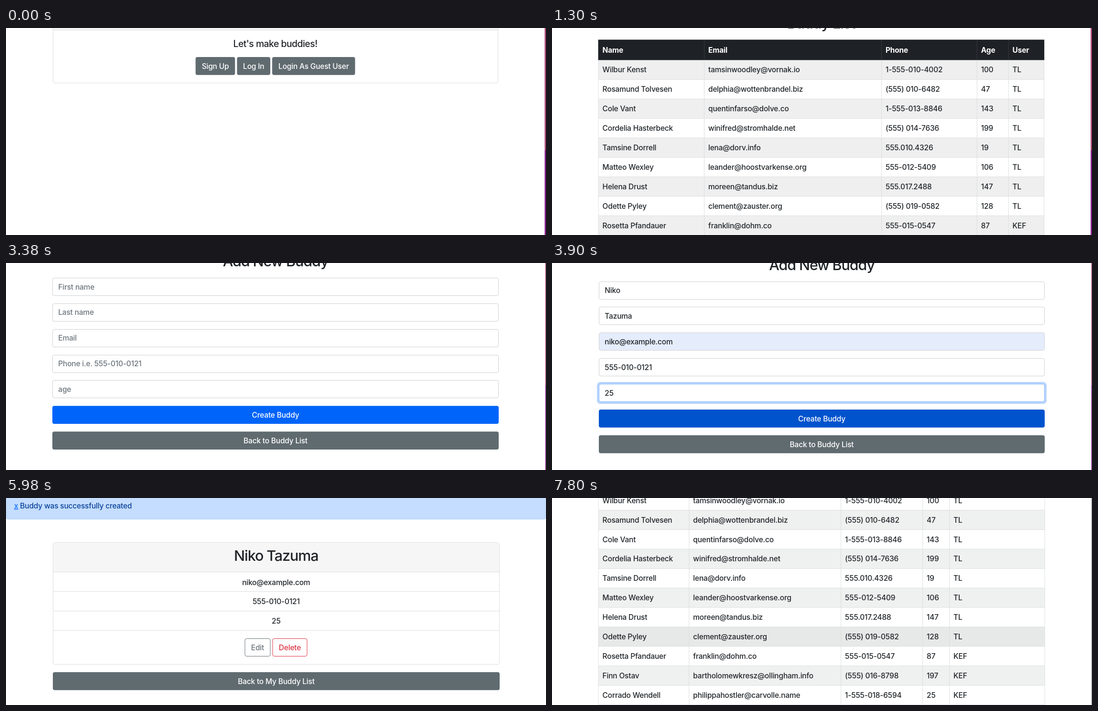
An HTML page for the animation above (8 s loop, 1130 by 435 pixels).

```html
<!DOCTYPE html>
<html lang="en">
<head>
<meta charset="utf-8">
<title>Buddy list</title>
<style>
  html, body { margin: 0; width: 100%; height: 100%; overflow: hidden; background: #fff; }
  svg { display: block; width: 1130px; height: 435px; }
  text {
    font: 450 15.5px Inter, "Open Sans", sans-serif;
    font-optical-sizing: none;
    letter-spacing: -.013em;
    fill: #212529;
  }
  .mid { text-anchor: middle; }
  .white { fill: #fff; }
  .hint { fill: #6c757d; }
  .red { fill: #dc3545; }
  .th { font-weight: 700; fill: #fff; }
  .h1, .h2, .h5 { font-weight: 550; letter-spacing: -.036em; }
  .h1 { font-size: 30.5px; }
  .h2 { font-size: 27px; }
  .h5 { font-size: 19.4px; letter-spacing: -.027em; }
  .notice { fill: #084298; }
  .link { fill: #0d6efd; text-decoration: underline; }

  .scene { visibility: hidden; animation: show 8s step-end infinite; }
  .scene:last-child { animation-name: show-last; }
  @keyframes show { 0% { visibility: visible; } 16.25%, 100% { visibility: hidden; } }
  @keyframes show-last { 0% { visibility: visible; } 2.5%, 100% { visibility: hidden; } }
</style>
</head>
<body>
<svg id="stage" viewBox="0 0 1130 435"></svg>
<script>
const GRAY = '#606b70', BLUE = '#0064fa', LINE = '#dcdee0', PITCH = 53.9;
const person = { first: 'Niko', last: 'Tazuma', email: 'niko@example.com', phone: '555-010-0121', age: '25' };
const fullName = `${person.first} ${person.last}`;

const buddies = [
  ['Wilbur Kenst', 'tamsinwoodley@vornak.io', '1-555-010-4002', 100, 'TL'],
  ['Rosamund Tolvesen', 'delphia@wottenbrandel.biz', '(555) 010-6482', 47, 'TL'],
  ['Cole Vant', 'quentinfarso@dolve.co', '1-555-013-8846', 143, 'TL'],
  ['Cordelia Hasterbeck', 'winifred@stromhalde.net', '(555) 014-7636', 199, 'TL'],
  ['Tamsine Dorrell', 'lena@dorv.info', '555.010.4326', 19, 'TL'],
  ['Matteo Wexley', 'leander@hoostvarkense.org', '555-012-5409', 106, 'TL'],
  ['Helena Drust', 'moreen@tandus.biz', '555.017.2488', 147, 'TL'],
  ['Odette Pyley', 'clement@zauster.org', '(555) 019-0582', 128, 'TL'],
  ['Rosetta Pfandauer', 'franklin@dohm.co', '555-015-0547', 87, 'KEF'],
  ['Finn Ostav', 'bartholomewkresz@ollingham.info', '(555) 016-8798', 197, 'KEF'],
  ['Corrado Wendell', 'philippahostler@carvolle.name', '1-555-018-6594', 25, 'KEF']
];

const rect = (x, y, w, h, fill, more = '') =>
  `<rect x="${x}" y="${y}" width="${w}" height="${h}" fill="${fill}" ${more}/>`;
const frame = (x, y, w, h, fill = '#fff', stroke = LINE) =>
  rect(x + .5, y + .5, w - 1, h - 1, fill, `stroke="${stroke}" rx="3.5"`);
const rule = (x, y, w, color = LINE) => rect(x, y, w, 1, color);
const text = (x, y, label, cls = '') => `<text x="${x}" y="${y}" class="${cls}">${label}</text>`;
const button = (x, y, w, label, fill = GRAY) =>
  rect(x, y, w, 37.8, fill, 'rx="4"') + text(x + w / 2, y + 24.7, label, 'mid white');
const outlined = (x, y, w, label, color, cls) =>
  frame(x, y, w, 38, '#fff', color) + text(x + w / 2, y + 24.7, label, 'mid ' + cls);

// cols holds the column edges; the last one is the right side of the table
function table(top, cols, rows, shade) {
  const step = 40.9, left = cols[0], width = cols[5] - left;
  let out = '';
  rows.forEach((row, i) => {
    const y = top + i * step;
    out += rect(left, y, width, step, shade(i)) + rule(left, y - .5, width);
    row.forEach((cell, c) => out += text(cols[c] + 8.6, y + 26, cell));
  });
  const bottom = top + rows.length * step;
  out += rule(left, bottom - .5, width);
  cols.forEach(x => out += rect(x - .3, top, 1, bottom - top, LINE));
  return out;
}

function welcome() {
  return frame(98, -60, 932, 176) + rect(99, 0, 930, 4, '#f7f7f7') + rule(98, 4, 932) +
    text(563.5, 40, "Let's make buddies!", 'mid h5') +
    button(396.7, 61, 82.6, 'Sign Up') + button(483.4, 61, 69.6, 'Log In') +
    button(557, 61, 173.5, 'Login As Guest User');
}

function buddyList() {
  const cols = [97, 318.4, 689.4, 889.2, 955, 1029.5];
  const titles = ['Name', 'Email', 'Phone', 'Age', 'User'];
  return text(563, 1, 'Buddy List', 'mid h1') +
    table(67.4, cols, buddies.slice(0, 9), i => i % 2 ? '#fff' : '#efefef') +
    rect(96.6, 24.5, 933.6, 42.9, '#1e2226') +
    titles.map((t, c) => text(cols[c] + 8.6, 51.6, t, 'th') +
      (c ? rect(cols[c] - .3, 25, 1, 42, '#373b3e') : '')).join('');
}

function form(x, top, w, values, filled) {
  const y = i => top + i * PITCH;
  let out = text(x + w / 2, top - 24, 'Add New Buddy', 'mid h1');
  values.forEach((value, i) => {
    const focus = filled && i === 4;
    if (focus) out += rect(x - 4, y(i) - 4, w + 8, 46, '#b8d5fd', 'rx="7"');
    out += frame(x, Math.round(y(i)), w, 38, filled && i === 2 ? '#e5edfd' : '#fff', focus ? '#86b7fe' : '#ced0d4');
    out += text(x + 12.3, y(i) + 24.7, value, filled ? '' : 'hint');
  });
  return out + button(x, y(5), w, 'Create Buddy', filled ? '#0053cd' : BLUE) +
    button(x, y(6), w, 'Back to Buddy List');
}

function created() {
  return frame(0, -10, 1130, 55, '#c5ddfe', '#b3d2fc') +
    text(17, 21.7, '<tspan class="link">x</tspan> Buddy was successfully created', 'notice') +
    frame(98, 93, 935, 257) + rect(99, 94, 933, 62, '#f6f6f6') +
    [155.5, 196.5, 237.5, 278.5].map(y => rule(98, Math.floor(y), 935)).join('') +
    text(565.3, 132, fullName, 'mid h1') +
    [person.email, person.phone, person.age].map((v, i) => text(565.3, 182.5 + i * 40.9, v, 'mid')).join('') +
    outlined(499.5, 295, 54, 'Edit', '#6c757d', 'hint') +
    outlined(557.5, 295, 73, 'Delete', '#dc3545', 'red') +
    button(98, 366, 935, 'Back to My Buddy List');
}

function myList() {
  const ink = '#212529';
  const envelope = rect(116, 137, 15.5, 12.5, ink, 'rx="1.8"') +
    '<path d="M116 139.8l6.2 4.7q1.6 1.1 3.2 0l6.1-4.7" fill="none" stroke="#f7f8fa" stroke-width="1.2"/>';
  const phone = rect(278, 136.5, 14, 14, ink, 'rx="2"') +
    '<path d="M281.8 139.8q.2 7.2 7 7.6" fill="none" stroke="#fff" stroke-width="1.5"/>' +
    '<path d="M281.7 140.6l1.2 1.8M286.4 145.5l2.1 1.3" stroke="#fff" stroke-width="2.4"/>';
  const badge = rect(403, 135.5, 12.2, 16, ink, 'rx="1.8"') +
    '<circle cx="409.1" cy="141.3" r="2" fill="#fff"/><path d="M405.6 147.6q0-3 3.5-3t3.5 3z" fill="#fff"/>';
  return text(565, 49, 'My Buddy List', 'mid h1') +
    frame(99, 73, 933, 99, '#f7f8fa', '#d9dadc') +
    text(115.7, 117.3, fullName, 'h2') +
    envelope + phone + badge +
    text(135, 149.2, person.email) + text(296, 149.2, person.phone) + text(418.6, 149.2, person.age) +
    button(99, 188, 933, 'New Buddy', BLUE) + button(99, 242, 933, 'Back to Buddy List');
}

const sunsetEdge = w => rect(1130 - w, 0, w, 257, '#ab4a78') + rect(1130 - w, 257, w, 178, '#85208c');
const grayEdge = rect(1129, 0, 1, 435, '#77777b');
const purpleEdge = rect(0, 0, 1, 175, '#a77fa3') + rect(0, 175, 1, 260, '#861f86');

const hints = ['First name', 'Last name', 'Email', 'Phone i.e. ' + person.phone, 'age'];
const scenes = [
  welcome() + sunsetEdge(2.8),
  buddyList() + sunsetEdge(2.8),
  form(97, 30.8, 934, hints, false) + sunsetEdge(1.4),
  form(98, 38.5, 933, Object.values(person), true) + sunsetEdge(1.4),
  created(),
  myList() + purpleEdge + grayEdge,
  table(-15.3, [97, 286.7, 604.5, 775.5, 831.5, 1031], buddies,
    i => i === 7 ? '#e7e9e8' : i % 2 ? '#eff1f0' : '#fff') + grayEdge
];

document.getElementById('stage').innerHTML = scenes.map((content, i) =>
  `<g class="scene" style="animation-delay:${i * 1300}ms">${rect(0, 0, 1130, 435, '#fff')}${content}</g>`).join('');
</script>
</body>
</html>
```
